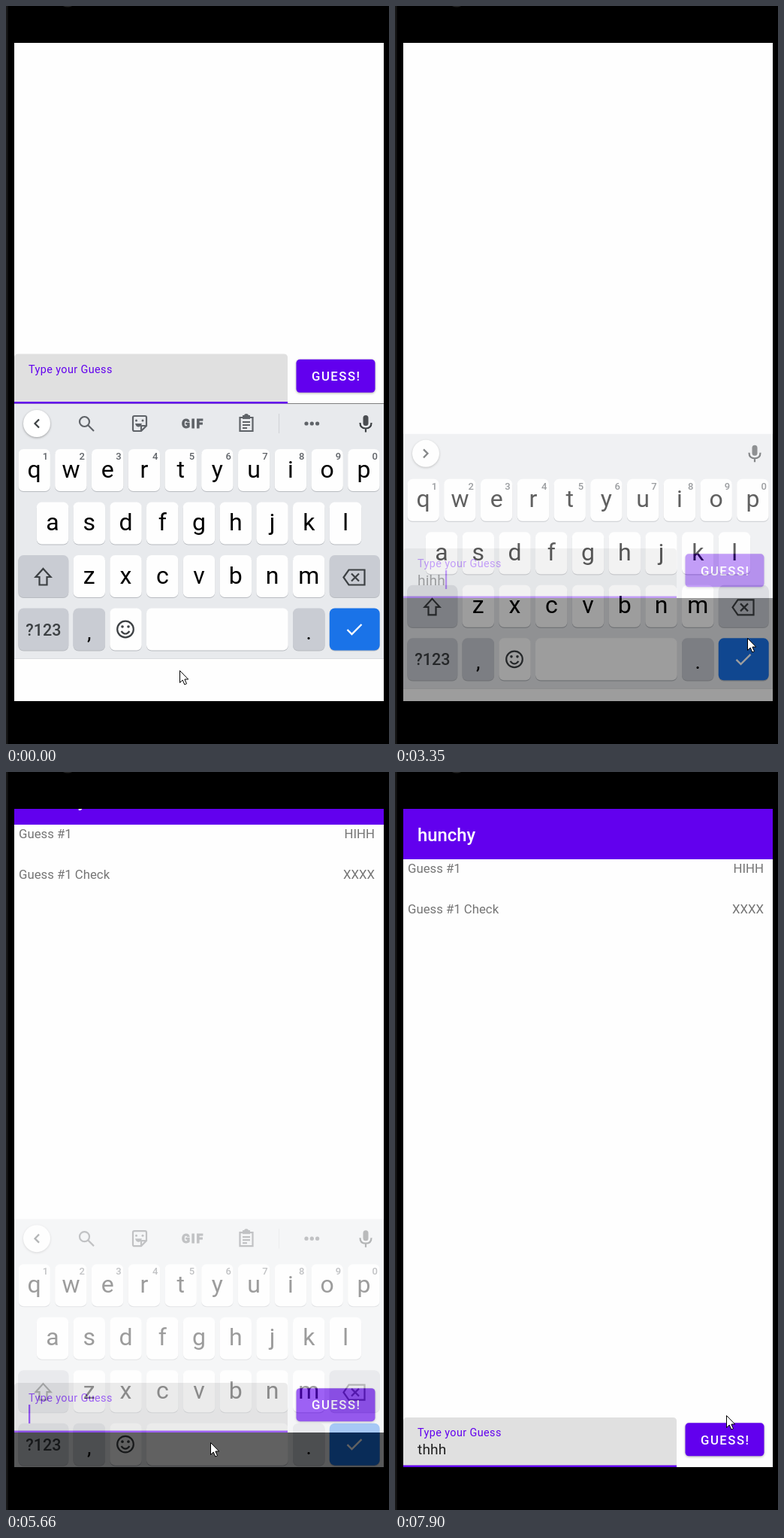
Animation, 510 px wide and 981 px high, one loop 8 s. Source, as an HTML page:

```html
<!DOCTYPE html>
<html lang="en">
<head>
<meta charset="utf-8">
<title>Word guessing game</title>
<style>
  html, body { margin: 0; height: 100%; overflow: hidden; background: #000; }
  svg { display: block; width: 100vw; height: 100vh; font-family: Roboto, sans-serif; }
  .mid { text-anchor: middle; }
  .end { text-anchor: end; }
  .medium { font-weight: 500; }
  .line { fill: none; stroke-width: 2.2; stroke: #3c4043; }
  #tools .line { stroke: #5f6368; }
  .row { font-size: 16.76px; fill: #757575; }
  .soft { filter: drop-shadow(0 1.5px 1.5px #0005); }
</style>
</head>
<body>
<svg viewBox="0 0 510 981">
  <defs><clipPath id="screen"><path d="M11 49h492v875H11z"/></clipPath></defs>
  <path d="M0 0h510v981H0z"/>
  <path d="M0 0h2.5v981H0z" fill="#161616"/>
  <ellipse cx="82" cy="-3" rx="8" ry="4.5" fill="#222"/>
  <g clip-path="url(#screen)">
    <g id="app">
      <path d="M11 49h492v875H11z" fill="#fefefe"/>
      <g id="rows" class="row">
        <text x="17" y="134">Guess #1</text><text x="491" y="134" class="end">HIHH</text>
        <text x="17" y="188">Guess #1 Check</text><text x="491" y="188" class="end">XXXX</text>
      </g>
      <path d="M11 49h492v67H11z" fill="#6200ee"/>
      <text x="30" y="92" class="medium" font-size="23.9" fill="#fff">hunchy</text>
      <path d="M11 924v-61q0-5 5-5h354q5 0 5 5v61z" fill="#e0e0e0"/>
      <path d="M11 921.5h364v2.5H11z" fill="#6200ee"/>
      <text x="30" y="883" font-size="14.36" letter-spacing=".42" fill="#6200ee">Type your Guess</text>
      <text id="guess" x="30" y="906.5" font-size="19.15" letter-spacing=".15" fill="#212121"></text>
      <rect id="under" x="30" y="908.5" height="1.3" fill="#212121"/>
      <rect id="caret" y="887" width="2.3" height="25" fill="#6200ee"/>
      <rect x="386.5" y="865.3" width="105" height="44" rx="4.8" fill="#6200ee" class="soft"/>
      <text x="407" y="893.5" class="medium" font-size="16.76" letter-spacing="1.5" fill="#fff">GUESS!</text>
    </g>
    <g id="board">
      <path d="M11 529h492v395H11z" fill="#e8eaed"/>
      <path d="M11 867h492v57H11z" fill="#fefefe"/>
      <path d="M11 867h492v1H11z" fill="#d9dbde"/>
      <g id="keys"></g>
      <path class="line" d="M49.5 748l10 11h-5v10.5h-10V759h-5z"/>
      <path class="line" d="M449.5 759.5l7-10h21v20h-21zM460 754.500l10 10m0-10l-10 10"/>
      <circle class="line" cx="159" cy="828.5" r="10.8"/>
      <path class="line" d="M153.500 831q5.500 7 11 0"/>
      <circle cx="155" cy="825" r="1.8" fill="#3c4043"/><circle cx="163" cy="825" r="1.8" fill="#3c4043"/>
      <path d="M454.500 829l6 6 13-13" fill="none" stroke="#fff" stroke-width="2.3"/>
      <circle cx="41" cy="555" r="18" fill="#fff" class="soft"/>
      <path id="chevron" class="line"/>
      <rect x="475.500" y="544" width="7" height="14" rx="3.5" fill="#4a4d51"/>
      <path class="line" d="M471.500 554q0 7.500 7.500 7.500t7.500-7.500M479 561.500v5"/>
      <g id="tools" fill="#5f6368">
        <circle class="line" cx="104.5" cy="552.5" r="6.5"/>
        <path class="line" d="M109 557l8 8"/>
        <path class="line" d="M187 547v11l-7 7h-9q-2 0-2-2v-16q0-2 2-2h14q2 0 2 2zM180 564v-6h6"/>
        <path d="M172 555h9q-2 5-5 4.500t-4-4.500z"/>
        <circle cx="173.5" cy="551" r="1.5"/><circle cx="182" cy="551" r="1.5"/>
        <text x="249" y="560.5" class="mid" font-size="16" font-weight="900" letter-spacing="1.8"
          stroke="#5f6368" stroke-width=".8">GIF</text>
        <path class="line" d="M311.500 547h17v18h-17z"/>
        <path d="M315 544h10v5h-10z"/><circle cx="320" cy="545" r="3"/>
        <path class="line" d="M315 553h10m-10 4h10m-10 4h6"/>
        <path d="M363 542h1v26h-1z" fill="#d0d2d6"/>
        <circle cx="400" cy="555" r="2.6"/><circle cx="407.3" cy="555" r="2.6"/><circle cx="414.6" cy="555" r="2.6"/>
      </g>
      <g id="hints" font-size="21" fill="#4a4d51" class="mid"></g>
    </g>
  </g>
  <path id="mouse" d="M.5.5v16l3.700-3.500 2.600 6 2.700-1.200-2.600-5.800h4.800z" fill="#fff" stroke="#000"/>
</svg>
<script>
const $ = id => document.getElementById(id);
const clamp = v => Math.min(1, Math.max(0, v));

// Keyboard grid: one unit is a letter key with its gap.
const UNIT = 48.75, GAP = 6.25, ROW = 70.5;

function key(col, row, units, fill, label = '', size = 32, base = 37.5, extra = '') {
  const x = 16.4 + col * UNIT, y = 589 + row * ROW, w = units * UNIT - GAP;
  const box = (dy, color) =>
    `<rect x="${x}" y="${y + dy}" width="${w}" height="56" rx="7" fill="${color}"/>`;
  return box(1.1, '#b8bbc0') + box(0, fill) +
    `<text class="mid" x="${x + w / 2}" y="${y + base}" font-size="${size}" ${extra}>${label}</text>`;
}

function buildKeys() {
  const grey = '#c9ccd3', white = '#fefefe';
  let out = '';
  ['qwertyuiop', 'asdfghjkl', 'zxcvbnm'].forEach((letters, row) =>
    [...letters].forEach((c, i) => {
      out += key(i + (10 - letters.length) / 2, row, 1, white, c);
      if (!row) out += `<text class="mid medium" x="${52.4 + i * UNIT}" y="603" font-size="13" fill="#5f6368">${(i + 1) % 10}</text>`;
    }));
  return out + key(0, 2, 1.5, grey) + key(8.5, 2, 1.5, grey) +
    key(0, 3, 1.5, grey, '?123', 21.5, 36, 'font-weight="500" fill="#3c4043"') +
    key(1.5, 3, 1, grey, ',', 28, 41) + key(2.5, 3, 1, white) + key(3.5, 3, 4, white) +
    key(7.5, 3, 1, grey, '.', 28, 41) + key(8.5, 3, 1.5, '#1a73e8');
}
$('keys').innerHTML = buildKeys();

const LOOP = 8000, BLINK = 500, SENT = 4070;
const guesses = [
  { word: 'hihh', start: 150, step: 363, end: SENT },
  { word: 'thhh', start: 5960, step: 240, end: LOOP },
];
const toggles = [{ at: 3230, hide: true }, { at: 5540, hide: false }, { at: 7400, hide: true }];
const completions = {
  hi: ['his', 'him'], hih: ['his', 'him'], hihh: ['high', 'higher'],
  th: ['the', 'that'], thh: ['the', 'that'],
};
// Pointer stops: time, x, y
const stops = [[2380, 231, 883], [2800, 401, 846], [3200, 469, 840], [3500, 469, 840], [4100, 444, 886],
  [4310, 444, 886], [4820, 272, 891], [6800, 272, 891], [7300, 452, 831], [7900, 441, 855]];

function typedAt(t) {
  const g = guesses.find(g => t >= g.start && t < g.end);
  return g ? g.word.slice(0, 1 + Math.floor((t - g.start) / g.step)) : '';
}

// The caret restarts its blink at every key press, send and keyboard toggle.
const inputs = [SENT, ...toggles.map(s => s.at),
  ...guesses.flatMap(g => [...g.word].map((_, i) => g.start + i * g.step))];

function caretAt(t) {
  const last = Math.max(...inputs.filter(at => at <= t));
  return Math.floor((t - last) / BLINK) % 2 === 0;
}

// 0 = keyboard open, 1 = gone; advances in visible jumps.
function hiddenAt(t) {
  const last = toggles.findLast(s => s.at <= t);
  if (!last) return 0;
  const u = clamp(Math.floor((t - last.at) / 120) * 120 / 316);
  return last.hide ? u : 1 - u;
}

function pointerAt(t) {
  const i = stops.findIndex(s => s[0] > t);
  if (i < 1) return (i ? stops.at(-1) : stops[0]).slice(1);
  const [a, b] = [stops[i - 1], stops[i]];
  const u = (t - a[0]) / (b[0] - a[0]), ease = u * u * (3 - 2 * u);
  return [1, 2].map(k => a[k] + (b[k] - a[k]) * ease);
}

function hintBar(words) {
  if (words.length === 1) return `<text x="255.5" y="563.5">${words[0]}</text>`;
  return words.map((word, i) => `<text x="${119.5 + 136 * i}" y="563.5">${word}</text>` +
    (i ? `<path d="M${39 + 144 * i} 541h1.500v28h-1.500z" fill="#cfd1d5"/>` : '')).join('');
}

const show = (id, on) => $(id).setAttribute('visibility', on ? 'visible' : 'hidden');
const move = (id, x, y) => $(id).setAttribute('transform', `translate(${x} ${y})`);

function draw(now) {
  const t = now % LOOP, text = typedAt(t), hidden = hiddenAt(t);
  const idle = text.length < 2;
  const words = idle || hidden ? [] : [text, ...(completions[text] || [])];

  $('guess').textContent = text;
  const width = text ? $('guess').getComputedTextLength() : 0;
  $('under').setAttribute('width', width);
  show('under', words.length);
  $('caret').setAttribute('x', 30 + width);
  show('caret', caretAt(t));
  show('rows', t >= SENT);

  move('app', 0, -395.5 * (1 - hidden) ** 2.22);
  move('board', 0, 105 * hidden);
  $('board').setAttribute('opacity', 1 - hidden);

  show('tools', idle);
  $('chevron').setAttribute('d', idle ? 'M44 549.500l-5.500 5.500 5.500 5.500' : 'M38 549.500l5.500 5.500-5.500 5.500');
  $('hints').innerHTML = hintBar(words);
  move('mouse', ...pointerAt(t));
  requestAnimationFrame(draw);
}
requestAnimationFrame(draw);
</script>
</body>
</html>
```
